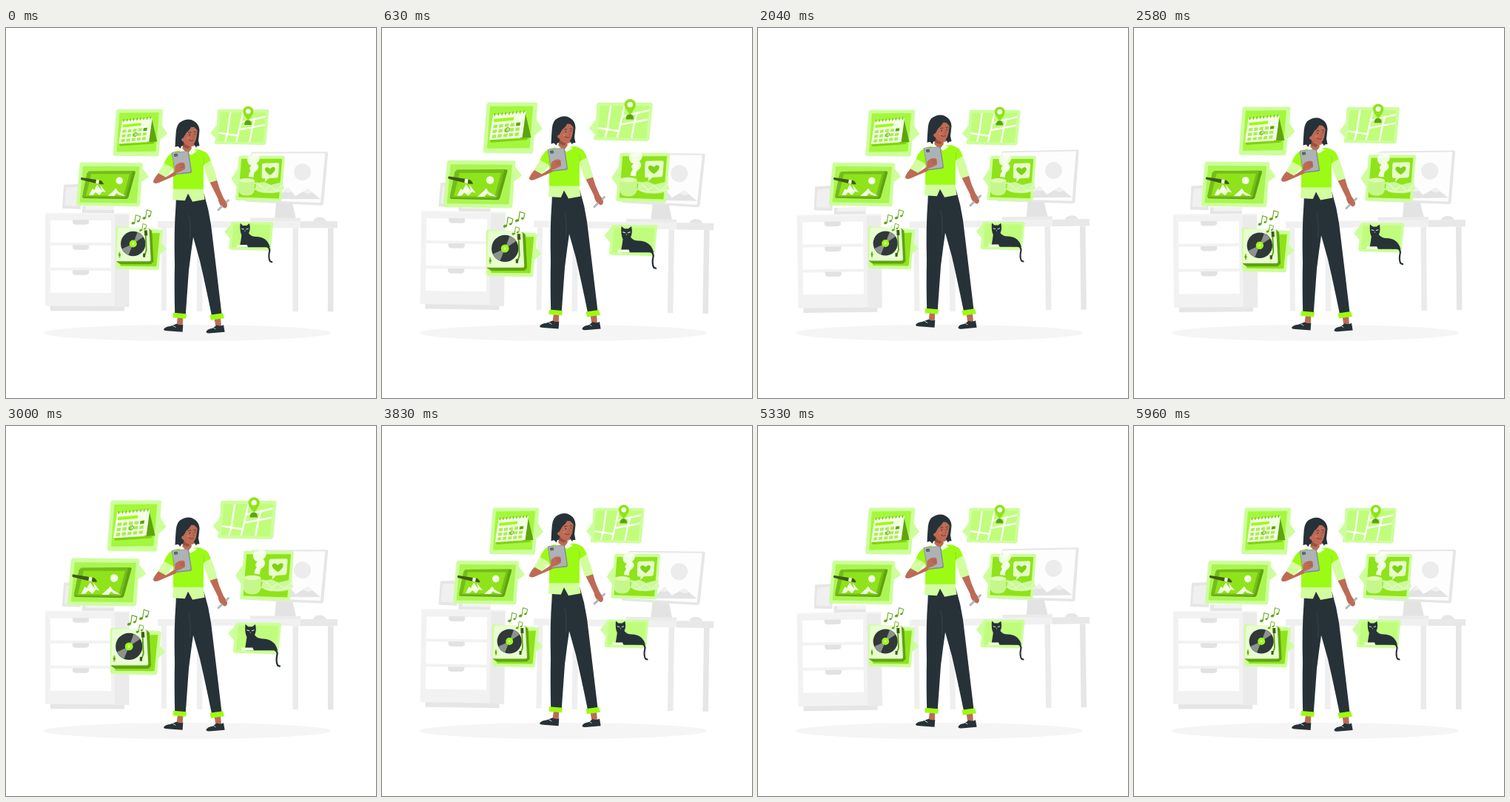
Recreate the animation shown at these times as an HTML page with a canvas. Size 500 by 500 pixels, loop 6 s.

```html
<!DOCTYPE html>
<html lang="en">
<head>
<meta charset="utf-8">
<title>Woman with tablet</title>
<style>
html, body { margin: 0; width: 100%; height: 100%; overflow: hidden; background: #fff; }
canvas { display: block; width: 100vw; height: 100vh; }
</style>
</head>
<body>
<canvas id="stage"></canvas>
<script>
const canvas = document.getElementById('stage');
const ctx = canvas.getContext('2d');
const ratio = window.devicePixelRatio || 1;
canvas.width = canvas.height = 500 * ratio;

const LOOP = 6000, LEAD = 40;
const C = {
  dark: '#263238', skin: '#bd6b55', shade: '#97503d',
  green: '#9cfb14', card: '#a3f73c', rich: '#8fe31a', mid: '#7fd016', deep: '#5ea40f',
  frame: '#cdfe9b', pale: '#c0fd7c', mist: '#f3ffe4', sleeve: '#d2fe9f'
};

const cache = {};
const shape = d => cache[d] || (cache[d] = new Path2D(d));

function fill(color, d) {
  ctx.fillStyle = color;
  ctx.fill(shape(d));
}
function line(color, width, d) {
  ctx.strokeStyle = color;
  ctx.lineWidth = width;
  ctx.stroke(shape(d));
}
function oval(color, x, y, rx, ry = rx, turn = 0) {
  ctx.fillStyle = color;
  ctx.beginPath();
  ctx.ellipse(x, y, rx, ry, turn, 0, Math.PI * 2);
  ctx.fill();
}
function rect(color, x, y, w, h) {
  ctx.fillStyle = color;
  ctx.fillRect(x, y, w, h);
}
function group(draw, ...matrix) {
  ctx.save();
  ctx.transform(...matrix);
  draw();
  ctx.restore();
}
function about(x, y, turn, size, draw) {
  ctx.save();
  ctx.translate(x, y);
  ctx.rotate(turn * Math.PI / 180);
  ctx.scale(size, size);
  ctx.translate(-x, -y);
  draw();
  ctx.restore();
}

// Linear interpolation through [position, value] keys.
function keyed(keys, p) {
  for (let i = 1; i < keys.length; i++) {
    const [a, u] = keys[i - 1], [b, v] = keys[i];
    if (p <= b) return u + (v - u) * (p - a) / (b - a);
  }
  return keys[keys.length - 1][1];
}
const SWAY = [[0, 0], [.25, 1], [.75, -1], [1, 0]];
const FLOAT = [[0, 0], [.5, -10], [1, 0]];
const BEAT = [[0, 1], [.1, 1.1], [.3, 1], [.4, 1], [.5, 1.1], [.6, 1], [1, 1]];

function cabinet() {
  rect('#e6e6e6', 60, 374, 100, 8.5);
  rect('#ebebeb', 146, 250, 20.5, 127);
  rect('#f2f2f2', 53, 250, 94, 126);
  rect('#f5f5f5', 53, 250, 113, 2);
  for (const y of [260, 294, 328]) {
    rect('#fff', 60, y, 82, 30);
    fill('#e2e2e2', `M90 ${y - .5}H112V${y + 4}L109 ${y + 6}H93L90 ${y + 4}Z`);
  }
  fill('#e6e6e6', 'M78 212L101 211V245L76 244Z');
  fill('#f0f0f0', 'M81 216L98 215V241L79 240Z');
  rect('#e6e6e6', 103, 241, 43, 9);
  rect('#f3f3f3', 108, 241, 38, 5);
}

function desk() {
  rect('#efefef', 210, 270, 7, 112);
  rect('#efefef', 258, 270, 7.5, 113);
  rect('#ebebeb', 387.5, 270, 7.5, 113);
  rect('#e6e6e6', 435, 270, 7.5, 113);
  rect('#f0f0f0', 205, 261, 243, 9);
  rect('#e8e8e8', 398, 261, 50, 9);

  fill('#e3e3e3', 'M365 236H387L392 258H363Z');
  rect('#ebebeb', 330, 256.5, 68, 4.5);
  fill('#e6e6e6', 'M331 170Q331 167.5 334 167.5L433 167Q435.5 167 435 170L429 237Q428.5 239.5 426 239.5L326 235Q323 235 323 232Z');
  fill('#fdfdfd', 'M332 169.5L430.5 169Q431.5 169 431 171L425 236L326 232Z');
  oval('#ececec', 400.5, 194.5, 11.5, 11.5);
  fill('#e3e3e3', 'M366 231L381 215L391 227L408 217L425 231Z');
  fill('#f1f1f1', 'M381 215L386 221L382 222L376 222ZM408 217L414 222L408 224L401 221Z');
  fill('#e5e5e5', 'M415 261Q417 255.5 424 255.5Q431 255.5 433 261Z');
}

function calendar() {
  fill(C.frame, 'M152 110.5H210.5Q212.5 110.5 212.2 113L211 132L218.3 143L208.5 152L206.8 171Q206.5 174 204 173.8L147.5 173Q145 173 145.2 170L149.5 113Q150 110.5 152 110.5Z');
  fill(C.card, 'M154 115.5L207 115L202.5 167L150 167.5Z');
  fill(C.deep, 'M197 122L204.5 154L191 155Z');
  fill(C.mid, 'M153 157L192 155L202 154L199 157L155 160Z');
  fill(C.mist, 'M157.5 126L198 122L193.5 154L152.8 157Z');
  group(() => {
    rect(C.green, 2, 5.3, 24.5, 3.8);
    for (let r = 0; r < 3; r++)
      for (let c = 0; c < 5; c++)
        rect(r === 0 && c === 4 ? C.deep : '#a9ec58', 2.5 + c * 7, 12.6 + r * 6.2, 5, 4);
    line(C.deep, .9, 'M18.2 20Q18 17.8 20.5 17.8Q23.5 18 23 20.8Q22 23.4 20 23Q18 22.6 18.2 20');
    for (let i = 0; i < 9; i++) line(C.deep, .9, `M${2 + i * 4.5} -1.5V1.2`);
  }, 1, -.095, -.14, 1, 157.5, 126);
}

function painting() {
  fill(C.frame, 'M103.5 181.8L183 182.5Q185.5 182.5 185.2 185L184.8 190L193.3 201L183.5 208L181.5 238Q181 241.3 178.5 241.2L98 239.8Q95.7 239.5 96 237L100.5 184.5Q101 181.8 103.5 181.8Z');
  fill('#aaf550', 'M105 187L181 187.5L177 236.5L100.5 235.5Z');
  fill(C.deep, 'M113 194L173.5 193.5Q176 193.5 175 196.5L166 228.5Q165 231 162.5 231L106 229.8Q103.5 229.5 104.5 226L110.5 196.5Z');
  fill('#74bd1c', 'M113 194L169.5 193.7Q171.5 194 171 196L163 227Q162 229 160 229L106 228.5Q104 228 104.5 225L110.5 196.5Z');
  fill(C.rich, 'M116 197.5H167.5L159.5 226.5H109Z');
  oval(C.mist, 153.8, 206.5, 4.8);
  fill(C.mist, 'M113 226L117.5 217L120 219L124 211.5L130 220L128 212L136 222L131 221L127 226L122 222L118 226Z');
  fill(C.mist, 'M138 227L146 220L149 216.5L152 221L162 227L154 226L150 223L147 227Z');
  fill('#3f5a1b', 'M103 202L123 205L122.3 210L102.3 205Q101.3 202.3 103 202Z');
  fill(C.mist, 'M122.8 205L126.8 205.6L126.2 210.6L122.1 209.8Z');
  fill('#3f5a1b', 'M126.8 205.6Q130.5 206 132.8 211Q129 211.8 126.2 210.6Z');
}

function note(x, y) {
  oval(C.deep, x, y, 2.3, 1.7, -.3);
  oval(C.deep, x + 6.8, y - 2.6, 1.7, 1.3, -.3);
  line(C.deep, 1, `M${x + 1.9} ${y}L${x + 3.5} ${y - 11}L${x + 9.6} ${y - 9}L${x + 8.3} ${y - 3}`);
}

function turntable() {
  fill(C.frame, 'M152 268L209.5 272Q212.3 272.5 212 275.5L210.5 290L217 298L208.5 305L207 324Q206.7 326.5 204 326.3L152 325Q149 324.5 149 321.5V271Q149 268 152 268Z');
  fill(C.rich, 'M158 278L208 276.5L203.5 321.5L155 321Z');
  fill(C.deep, 'M193 270L197.5 274L199.5 315L196 318.5H155L150 315Z');
  fill('#e8fdd0', 'M151.5 271.5Q151.5 269.5 153.5 269.5H191.5Q193.5 269.5 193.8 272L196 312Q196 314.5 194 314.5H152.5Q150 314.5 150 312Z');
  oval('#30383a', 172.2, 291, 16.6);
  fill('#8c928e', 'M172.2 291L178 275.5Q183 277.5 186 281.8ZM172.2 291L157.2 298Q160.5 304 166 306.3Z');
  oval(C.green, 172.2, 291, 5);
  oval(C.mist, 172.2, 291, 1.4);
  line(C.deep, 1.8, 'M188.8 274L190 300L187 308');
  fill('#3f5a1b', 'M187.3 273H191L191.5 280H187.6Z');
  rect('#3f5a1b', 185.5, 304, 3, 5);
  line(C.mid, 2, 'M154 303V309');
  oval(C.deep, 154, 306, 1.5);
  note(172.3, 263.4);
  note(187, 256.6);
  about(182.5, 273, 0, .8, () => note(182.5, 273));
}

function map() {
  const inner = 'M289.5 114.8H350.5L346.5 155L286.3 153.5Z';
  fill(C.frame, 'M287.5 110.8H352Q354.8 110.8 354.5 113.5L350.5 156Q350 158.8 347.5 158.5L284 157.2Q281.3 157 281.6 154.5L283.1 150L276 142.5L284.6 131L285.5 113Q285.7 110.8 287.5 110.8Z');
  fill(C.pale, inner);
  ctx.save();
  ctx.clip(shape(inner));
  line('#fcfff7', 2.3, 'M303 114L299 142L295 157M320 114L313 145L310 157M286 142L313 146M317 128L352 120M314.5 138L350 131.5M335.5 123L332 136L328 157');
  ctx.restore();
  fill(C.deep, 'M321.5 131.5Q321.5 125 326.3 125Q331.2 125 331.2 131.5Z');
  fill(C.rich, 'M326.7 125.5Q319.7 118 319.7 113.5A7 7 0 0 1 333.7 113.5Q333.7 118 326.7 125.5Z');
  oval(C.mist, 326.7, 113.3, 3.4);
}

function coffee() {
  fill(C.frame, 'M317 172.8L373.5 173Q376 173 375.8 175.5L371.5 231.5Q371 234.5 368.5 234.3L311.5 232.8Q309 232.5 309.3 230L311 214L303.8 203.5L312.8 190L314 175Q314.5 172.8 317 172.8Z');
  fill(C.rich, 'M317.5 177H372.3L368 230.3L313.5 228.5Z');
  fill('rgba(248,255,238,.95)', 'M325.5 179Q325 172.5 331 173.5Q337 169.5 341.5 174Q343 180 338 183Q343 188 338 193Q333.5 195 334 202L327 201Q327.5 196 330 193Q326.5 190 331 186Q326 185 325.5 179Z');
  fill('rgba(200,248,145,.96)', 'M313.5 206Q324 202 335.5 206L335 220Q333 226.5 325 226.5Q315 226.5 313.8 220Z');
  oval('rgba(224,253,186,.9)', 324.5, 206, 10.5, 3);
  line('#c8f891', 2.2, 'M335 210Q341 208 341 213Q340 218 335 218');
  fill('rgba(208,250,164,.95)', 'M337 210L348 208L357 212L373 208L375 218Q368 224 353 223Q340 223 336 218Z');
  line('rgba(239,255,216,.9)', 1, 'M341 211L349 219L356 213L364 220L373 212M340 219Q354 224 373 218');
  fill('#e6fec8', 'M347.5 183L366 182.5Q368.5 182.5 368.2 185L367 200Q366.6 202.7 364 202.7L354 203.2L349 208.3L349.5 203.5L347 203.5Q344.7 203.3 344.8 201L345.3 185.3Q345.4 183 347.5 183Z');
  fill(C.mid, 'M356 199Q348 193.5 349.2 190Q351.7 186.5 356.1 190.5Q360.2 186 362.8 189.5Q363.7 194 356 199Z');
}

function cat() {
  fill(C.frame, 'M306 261.5L358 261.8Q360.8 262 360.4 264.5L357 298Q356.5 300.8 354 300.5L303.5 299Q300.5 298.7 300.8 296.2L302 283.5L294.8 275L303 265.5L303.5 264Q304 261.5 306 261.5Z');
  fill(C.pale, 'M307 265L357 265.5L354 297L304.5 296Z');
  line(C.dark, 2.1, 'M345 294.5Q355 293 355.5 300Q353.3 310 356 314.5L358.5 315.5');
  fill(C.dark, 'M315.5 294Q317 286 317.8 279.5Q315 274 316 263.5L319.6 266.6H324.6L328.3 263.7Q330.2 271 327.5 277Q331 281.5 337 281.5Q352 281.5 356 295.8H317Z');
  line('#dce9d1', 1, 'M318 270.8L320.8 271.6M324 271.6L326.7 270.8');
  oval('#dce9d1', 322.3, 273.8, .6);
  fill(C.mist, 'M311.5 292.5H325L326.5 296H311Z');
}

function cards() {
  calendar();
  painting();
  turntable();
  map();
  coffee();
  cat();
}

function legs() {
  fill(C.skin, 'M232 390H239.5L238.6 403L230.5 402Z');
  fill(C.skin, 'M281.5 392H290L291 404L283.5 405Z');
  fill(C.dark, 'M213 407.5Q214.5 404 222 403.2L230.5 400Q235 402.5 239.3 401L238.6 411L218 409.5Q213.3 409.4 213 407.5Z');
  fill(C.dark, 'M270.5 410.8Q271.5 407.3 279 406L285 401.8Q290 403.8 294 401.4L295.6 411L275 412.8Q270.5 412.8 270.5 410.8Z');
  line('#d9f7bd', .9, 'M225.5 402.5L229 404.5M280 405L283 407');
  fill(C.dark, 'M245 224H267.5Q274 245 277 266Q283 315 291.5 387L278 389Q269 345 262 315L250 272Z');
  fill(C.dark, 'M230 224H260L254 276Q250 303 247 328L242.8 387H228.2Q227.3 350 228 320Q226.8 275 229.5 240Z');
  line('#3a474d', .8, 'M247 253Q250 267 248.5 285');
  fill(C.green, 'M226 385L244 386.5L243 393L225.5 391.5Z');
  fill(C.green, 'M275.5 388L293 385.5L295 392.5L277 395Z');
}

function torso() {
  fill(C.skin, 'M274 206L284.5 204Q288 218 294 230L298.5 236.5Q300 242 296 244L291.5 241.5Q287.5 238 286.5 231Z');
  line('#b3b8bc', 3, 'M287 246L300.5 233');
  fill(C.skin, 'M292 234L297 235L298.5 242L294 243L290 238Z');

  fill(C.sleeve, 'M266 182L276 177Q282 192 285.5 206L274.5 209.5Q269 196 266 182Z');
  fill(C.sleeve, 'M226 216H266.5L268.5 232L252 235L246 224L241.8 233.5L225 232.5Z');
  fill(C.green, 'M238 165L261 164.5Q269 167 272 170Q276 176 276.5 179.5L267 185L266.8 218H226V191L213 184Q219 169 229 167Z');
  fill(C.sleeve, 'M213.5 183L226 189.5L216.5 203L205 197Z');
  line('#83d416', .6, 'M226 181V190M267 175Q268 180 267 185');
  fill(C.skin, 'M239.5 153H250L251 165L245.5 170L238 166Z');
  fill(C.mist, 'M238 163L245.5 170L240 172L234.5 167ZM251 163L258 167L250 172L246 169.5Z');

  fill(C.skin, 'M206 196.5L216 202L231 192L239 182L243 187L238 194L228 200L206 209.5Q200 211.5 198.8 208Q200 203 206 196.5Z');
  fill('#858c91', 'M225.5 168L244.5 166.5Q246.8 166.4 247.2 168.5L251 193.5Q251.2 195.6 249.7 196.2L231 198.3Q228.8 198.3 228.5 196.3L223.8 170.2Q223.5 168.2 225.5 168Z');
  fill('#adb2b6', 'M226 168.5L244 167.2Q245.5 167.2 245.8 168.7L249.6 193Q249.6 194.4 248.2 194.7L231 196.8Q229.3 196.8 229 195.3L224.5 170.2Q224.4 168.7 226 168.5Z');
  fill('#4b5256', 'M227 170.5L231.5 170L232.2 173.6L227.7 174.2Z');
  oval('#858c91', 229.8, 172.2, .9);
  fill(C.skin, 'M228.5 187Q232 182 238.5 182L241 182.8Q242.5 184 241 185.3Q243 186.5 241.4 188.3Q243 190 240.8 191.4L236 194L228 197Z');
  line(C.shade, .6, 'M235.5 185.4H241M236 188.4H241.3');
}

function head() {
  fill(C.dark, 'M228.5 161Q229 149 229.8 140Q231 129 238 126Q247 121.5 254 126Q261 130 261.5 139L260 152L237 160L235.5 163.3L232.5 160Z');
  fill(C.shade, 'M240 154L250 159L246 163.5L239.5 161Z');
  fill(C.skin, 'M237.5 148Q241 144 242 140L249 134L259 134Q260.3 147 257.8 155Q255 161 248.5 160.5Q242.5 159 240.5 154.5Q235.8 153 237.5 148Z');
  fill(C.dark, 'M236 150.5Q239 138 244 133L252 129Q250 137 243.8 141.5L239.7 148.5ZM249.5 132Q255 133 259.5 140L261 137L257 129Z');
  fill(C.dark, 'M258.3 138Q261 145 260 152L261.5 159.5L257.8 160L257 162L253.8 157Q258.3 151 258.3 138Z');
  oval(C.dark, 248.3, 144.7, .7, 1);
  oval(C.dark, 255.4, 143.6, .6, .9);
  line(C.dark, .7, 'M246.3 141.9Q248 140.6 250 141.3M254 140.8L256.5 140.4');
  line(C.shade, .6, 'M252.6 144.5L254.2 148.3L252.2 149');
  line('#6f3227', .8, 'M247.3 151.5Q250 153.8 253.3 152');
  oval('#d07c66', 246, 149, 1.7, 1.2);
}

function woman() {
  legs();
  torso();
  head();
}

function draw(t) {
  const half = t % 3000 / 3000;
  ctx.setTransform(canvas.width / 500, 0, 0, canvas.height / 500, 0, 0);
  ctx.lineCap = ctx.lineJoin = 'round';
  rect('#fff', 0, 0, 500, 500);
  oval('#f5f5f5', 245, 412, 194, 11);
  about(250.5, 275, keyed(SWAY, half), 1, () => { cabinet(); desk(); });
  about(236, 217, 0, keyed(BEAT, t / LOOP), cards);
  group(woman, 1, 0, 0, 1, 0, keyed(FLOAT, half));
}

const start = performance.now();
function tick() {
  draw((performance.now() - start + LEAD) % LOOP);
  requestAnimationFrame(tick);
}
tick();
</script>
</body>
</html>
```
